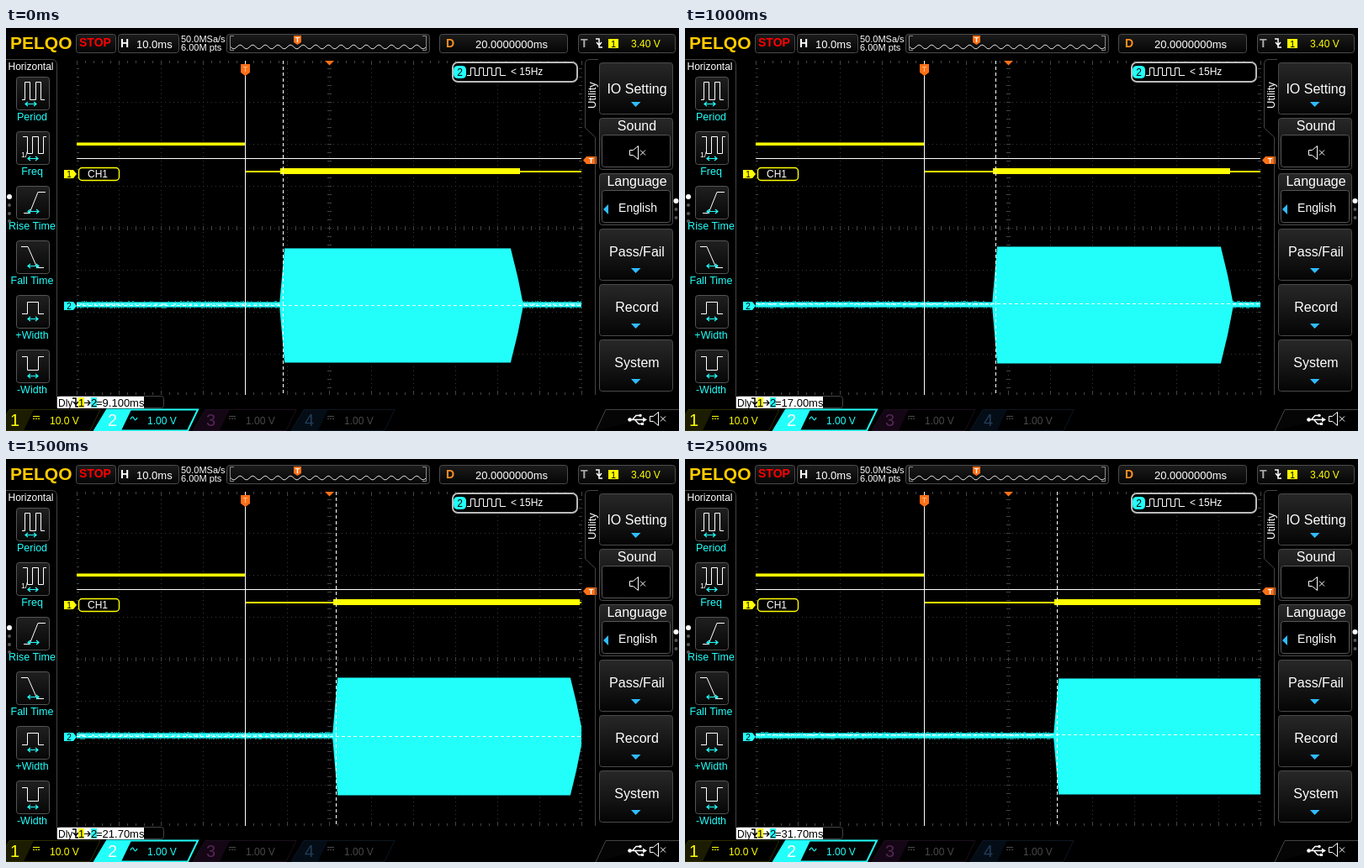
Recreate the animation shown at these times as an HTML page with a canvas. Size 800 by 480 pixels, loop 3 s.

```html
<!DOCTYPE html>
<html lang="en">
<head>
<meta charset="utf-8">
<title>Oscilloscope delay</title>
<style>
html, body { margin: 0; width: 800px; height: 480px; overflow: hidden; background: #000; }
canvas { display: block; }
</style>
</head>
<body>
<canvas id="scope" width="800" height="480"></canvas>
<script>
const ctx = document.getElementById('scope').getContext('2d');
const YELLOW = '#ffff00', CYAN = '#22fffa', ORANGE = '#ff7018', BLUE = '#30bcff', WHITE = '#fff';
const LEFT = 84, RIGHT = 684, TOP = 39, BOTTOM = 437, TRIGGER_X = 284;
const STEP_MS = 500, DASH = 4, DASH_STEP = 7;

// delay in ms, x where the burst ends, top and bottom of the burst, y of the dashed cursor
const shots = [
  { delay: '9.100', end: 615, top: 263, bottom: 398, mid: 330 },
  { delay: '11.80', end: 631, top: 261, bottom: 400, mid: 328 },
  { delay: '17.00', end: 652, top: 261, bottom: 399, mid: 328 },
  { delay: '21.70', end: 686, top: 261, bottom: 400, mid: 330 },
  { delay: '26.60', end: 900, top: 262, bottom: 399, mid: 330, freq: '105.646MHz' },
  { delay: '31.70', end: 900, top: 262, bottom: 399, mid: 328 }
];

function rect(x, y, w, h, color) {
  ctx.fillStyle = color;
  ctx.fillRect(x, y, w, h);
}

function text(s, x, y, size, color, align = 'left', weight = '') {
  ctx.font = `${weight} ${size}px "Liberation Sans", Arial, sans-serif`;
  ctx.textAlign = align;
  ctx.fillStyle = color;
  ctx.fillText(s, x, y);
}

function box(x, y, w, h, r, stroke, fill, width = 1) {
  ctx.beginPath();
  ctx.roundRect(x + .5, y + .5, w, h, r);
  if (fill) { ctx.fillStyle = fill; ctx.fill(); }
  ctx.strokeStyle = stroke;
  ctx.lineWidth = width;
  ctx.stroke();
}

function path(d, stroke, fill, width = 1, x = 0, y = 0) {
  const p = new Path2D(d);
  ctx.save();
  ctx.translate(x, y);
  if (fill) { ctx.fillStyle = fill; ctx.fill(p); }
  if (stroke) { ctx.strokeStyle = stroke; ctx.lineWidth = width; ctx.stroke(p); }
  ctx.restore();
}

function dot(x, y, r, color) {
  ctx.fillStyle = color;
  ctx.beginPath();
  ctx.arc(x, y, r, 0, Math.PI * 2);
  ctx.fill();
}

function shade(y, h, from, to) {
  const g = ctx.createLinearGradient(0, y, 0, y + h);
  g.addColorStop(0, from);
  g.addColorStop(1, to);
  return g;
}

function noise(n) {
  const v = Math.sin(n * 12.9898) * 43758.5453;
  return v - Math.floor(v);
}

function speaker(x, y) {
  path('M0.5 5.5H4.5L10.5 0.5V16.5L4.5 11.5H0.5Z M13 5.5L19 11.5 M19 5.5L13 11.5', WHITE, null, 1, x, y);
}

function edge(x, y, color) {
  path('M0 0H4V10H8 M1 4L4 7.5L7 4', color, null, 1.5, x, y);
}

function drawTopBar() {
  const panel = (x, w) => box(x, 7, w, 22, 3, '#4c4c4c', shade(7, 22, '#1c1c1c', '#050505'));
  text('PELQO', 5, 25, 21, '#ffcc00', 'left', 'bold');
  panel(83, 47);
  text('STOP', 87, 22, 14, '#ff0000', 'left', 'bold');
  panel(133, 72);
  text('H', 136, 23, 14, WHITE, 'left', 'bold');
  text('10.0ms', 155, 24, 13, WHITE);
  text('50.0MSa/s', 208, 17, 11, WHITE);
  text('6.00M pts', 208, 27, 11, WHITE);

  panel(262, 241);
  path('M271 9.5H266.5V26.5H271 M495 9.5H499.5V26.5H495', '#888');
  ctx.beginPath();
  for (let x = 267; x <= 499; x++) ctx.lineTo(x, 22.5 + 2.3 * Math.sin((x - 267) * Math.PI / 7.5));
  ctx.strokeStyle = '#ddd';
  ctx.lineWidth = 1;
  ctx.stroke();
  path('M342 9H351V17L346.5 20L342 17Z', null, ORANGE);
  text('T', 346.5, 17, 9, WHITE, 'center', 'bold');

  panel(515, 152);
  text('D', 523, 23, 14, '#ff9020', 'left', 'bold');
  text('20.0000000ms', 558, 24, 13, WHITE);
  panel(680, 115);
  text('T', 683, 23, 14, '#aaa', 'left', 'bold');
  edge(701, 13, WHITE);
  rect(716, 13, 12, 11, YELLOW);
  text('1', 722, 23, 11, '#000', 'center');
  text('3.40 V', 743, 23, 12, YELLOW);
}

function drawLeftPanel() {
  path('M0 37.5H54Q60.5 37.5 60.5 44V452', '#444');
  text('Horizontal', 29.5, 50, 12, WHITE, 'center');
  const items = [
    ['Period', 'M7 27.5H10.5V6.5H16.5V27.5H23.5V6.5H29.5V27.5H34', 11, 24, 32],
    ['Freq', 'M8 6.5H13.5V26.5H19.5V6.5H26.5V26.5H32.5V6.5H36', 14, 26, 32],
    ['Rise Time', 'M9 32.5H16L26 7.5H35', 14, 27, 30],
    ['Fall Time', 'M6 7.5H14L25 32.5H33', 14, 27, 30],
    ['+Width', 'M7 22.5H13.5V8.5H26.5V22.5H33', 14, 26, 28],
    ['-Width', 'M7 8.5H13.5V24.5H26.5V8.5H33', 14, 26, 31]
  ];
  items.forEach(([label, icon, a, b, y], i) => {
    const by = 58 + i * 65;
    box(12, by, 39, 39, 3, '#555', shade(by, 40, '#202020', '#060606'));
    path(icon, WHITE, null, 1, 12, by);
    path(`M${a} ${y}.5H${b} M${a + 3} ${y - 2}L${a} ${y}.5L${a + 3} ${y + 3} M${b - 3} ${y - 2}L${b} ${y}.5L${b - 3} ${y + 3}`, CYAN, null, 1.2, 12, by);
    if (label === 'Freq') text('1/', 18, by + 31, 9, WHITE);
    text(label, 31, by + 52, 12.5, CYAN, 'center');
  });
  [201, 211, 221, 230].forEach((y, i) => dot(4, y, i ? 2 : 3, i ? '#555' : WHITE));
}

function drawRightPanel() {
  path('M704 37.5H694Q688.5 37.5 688.5 43V119L700.5 130V437', '#444');
  ctx.save();
  ctx.translate(701, 96);
  ctx.rotate(-Math.PI / 2);
  text('Utility', 0, 0, 13, WHITE);
  ctx.restore();

  const items = [
    ['IO Setting', 37], ['Sound', 15, true], ['Language', 15, true],
    ['Pass/Fail', 33], ['Record', 33], ['System', 33]
  ];
  items.forEach(([label, baseline, inset], i) => {
    const y = 41 + i * 66;
    box(705, y, 87, 61, 3, '#4a4a4a', shade(y, 62, '#282828', '#040404'));
    text(label, 750, y + baseline, 16, WHITE, 'center');
    if (inset) box(708, y + 20, 81, 38, 3, '#555', '#000');
    else path('M743 0H754.5L748.5 6Z', null, BLUE, 1, 0, y + 47);
  });
  speaker(741, 140);
  path('M716 210V222L710 216Z', null, BLUE);
  text('English', 751, 219, 14, WHITE, 'center');
  [206, 216, 226].forEach((y, i) => dot(796.5, y, i ? 2 : 3, i ? '#555' : WHITE));
}

function drawChannels() {
  const channel = (n, x, { badge, outline, digit, color, value, ac }) => {
    path('M15 0.5H123L111 25.5H0Z', null, '#000', 1, x, 454);
    path('M15 0.5H44L32 25.5H0Z', null, badge, 1, x, 454);
    path('M15 0.5H123L111 25.5H0Z', outline, null, ac ? 2 : 1, x, 454);
    text(n, x + 16, 474, 20, digit);
    if (ac) path('M0 2Q2 -3 4 1T8 0', color, null, 1.2, x + 43, 464);
    else {
      rect(x + 43, 462, 8, 1, color);
      for (let i = 0; i < 3; i++) rect(x + 43 + i * 3, 465, 2, 1, color);
    }
    text(value, x + 63, 472, 12, color);
  };
  channel('1', -11, { badge: '#1c1c00', outline: '#2c2c00', digit: YELLOW, color: YELLOW, value: '10.0 V' });
  channel('3', 222, { badge: '#140614', outline: '#1c0e1c', digit: '#562656', color: '#484848', value: '1.00 V' });
  channel('4', 339, { badge: '#040c16', outline: '#0c1622', digit: '#223c58', color: '#484848', value: '1.00 V' });
  channel('2', 105, { badge: CYAN, outline: CYAN, digit: WHITE, color: CYAN, value: '1.00 V', ac: true });

  path('M800 454.5H713L701 480', '#444', '#050505');
  path('M741 466.5H759 M745 466L749 461.5H753 M748 467L752 471.5H756', WHITE, null, 1.3);
  path('M757 463.5L762 466.5L757 469.5Z', null, WHITE);
  dot(741.5, 466.5, 2.3, WHITE);
  dot(754, 461.5, 1.7, WHITE);
  rect(755, 470, 3, 3, WHITE);
  speaker(765, 457);
}

function drawGrid() {
  for (let x = LEFT; x <= RIGHT; x += 50)
    for (let y = 43; y <= BOTTOM; y += 5) rect(x, y, 1, 1, '#393939');
  for (let y = 88; y < BOTTOM; y += 50)
    for (let x = LEFT; x <= RIGHT; x += 5) rect(x, y, 1, 1, '#393939');
  for (let x = LEFT; x <= RIGHT; x += 10) {
    const n = (x - LEFT) % 50 ? 3 : 5;
    rect(x, TOP, 1, n, '#444');
    rect(x, BOTTOM - n, 1, n, '#444');
    rect(x, 236, 1, 5, '#444');
  }
  for (let y = 48; y < BOTTOM; y += 10) {
    rect(LEFT, y, 3, 1, '#444');
    rect(RIGHT - 3, y, 3, 1, '#444');
    rect(382, y, 5, 1, '#444');
  }
}

function drawTraces(shot, cursor, seed) {
  const { top, bottom, end } = shot, mid = 330, start = cursor - 4;
  ctx.save();
  ctx.beginPath();
  ctx.rect(LEFT, TOP, RIGHT - LEFT, BOTTOM - TOP);
  ctx.clip();

  rect(LEFT, 136, 200, 1, '#8c8c00');
  rect(LEFT, 137, 200, 3, YELLOW);
  rect(TRIGGER_X, 170, 400, 2, YELLOW);
  rect(cursor - 3, 167, end - 1 - cursor, 7, YELLOW);

  for (let x = LEFT; x < RIGHT; x++) {
    const a = noise(x + seed * 701), b = noise(x * 3 + seed * 97);
    rect(x, 326 - (a > .7), 1, 7 + (a > .7) + (b > .65), '#109a9a');
    rect(x, 327, 1, 5, CYAN);
    if (b > .55) rect(x, 328, 1, 2, '#a8ffff');
  }

  const half = (mid - top) / 2;
  path(`M${start} ${mid}L${start + 6} ${top}H${end - 15}Q${end - 6} ${top + half} ${end} ${mid}Q${end - 6} ${bottom - half} ${end - 15} ${bottom}H${start + 6}Z`, null, CYAN);
  const flat = end - 21 - start;
  rect(start + 6, top - 1, flat, 1, '#128888');
  rect(start + 6, bottom, flat, 1, '#128888');
  ctx.restore();
}

function drawCursors(shot, cursor) {
  rect(LEFT, 155, 600, 1, WHITE);
  rect(TRIGGER_X, TOP, 1, BOTTOM - TOP, WHITE);
  for (let y = TOP; y < BOTTOM; y += DASH_STEP) rect(cursor, y, 1, Math.min(DASH, BOTTOM - y), WHITE);
  for (let x = LEFT; x < RIGHT; x += DASH_STEP) rect(x, shot.mid, Math.min(DASH, RIGHT - x), 1, WHITE);

  path('M279 43H290V53L284.5 57L279 53Z', null, ORANGE);
  text('T', 284.5, 52, 9, '#ffd0a0', 'center');
  path('M379 39H390L384.5 44.5Z', null, ORANGE);
  path('M686 157.5L690 153H702V162H690Z', null, ORANGE);
  text('T', 695.5, 161, 9, WHITE, 'center', 'bold');
  [['1', 169, YELLOW], ['2', 326, CYAN]].forEach(([n, y, color]) => {
    path('M69 0H80L84 5L80 10H69Z', null, color, 1, 0, y);
    text(n, 75, y + 9, 10, '#000', 'center');
  });
  box(86, 166, 48, 15, 4, YELLOW, '#000', 1.4);
  text('CH1', 97, 178, 12, WHITE);
}

function drawReadouts(shot) {
  box(530.5, 40.5, 148, 23, 6, '#bbb', '#000', 2);
  box(532, 45, 14, 14, 4, CYAN, CYAN);
  text('2', 539.5, 57, 12, '#000', 'center');
  path('M548 56.5H552.5V47.5H557.5V56.5H562.5V47.5H567.5V56.5H572.5V47.5H577.5V56.5H582.5V47.5H587.5V56.5H594', WHITE);
  text(shot.freq || '< 15Hz', 600, 56, 12, WHITE);

  box(61, 438, 126, 14, 3, '#444', '#000');
  rect(61, 439, 103, 14, WHITE);
  text('Dly', 62, 451, 12, '#000');
  edge(79, 441, '#000');
  rect(86, 440, 7, 12, YELLOW);
  text('1', 86, 451, 13, '#000');
  path('M93 446.5H100 M97 443.5L100 446.5L97 449.5', '#000', null, 1.2);
  rect(101, 440, 7, 12, CYAN);
  text('2', 101, 451, 13, '#000');
  text(`=${shot.delay}ms`, 107, 451, 13, '#000');
}

function draw(index) {
  const shot = shots[index];
  const cursor = Math.floor(TRIGGER_X + shot.delay * 5);
  rect(0, 0, 800, 480, '#000');
  drawGrid();
  drawTraces(shot, cursor, index + 1);
  drawCursors(shot, cursor);
  drawTopBar();
  drawLeftPanel();
  drawRightPanel();
  drawChannels();
  drawReadouts(shot);
}

let shown = -1;
const began = performance.now();
function tick() {
  const index = Math.floor((performance.now() - began) / STEP_MS) % shots.length;
  if (index !== shown) draw(shown = index);
  requestAnimationFrame(tick);
}
tick();
</script>
</body>
</html>
```
